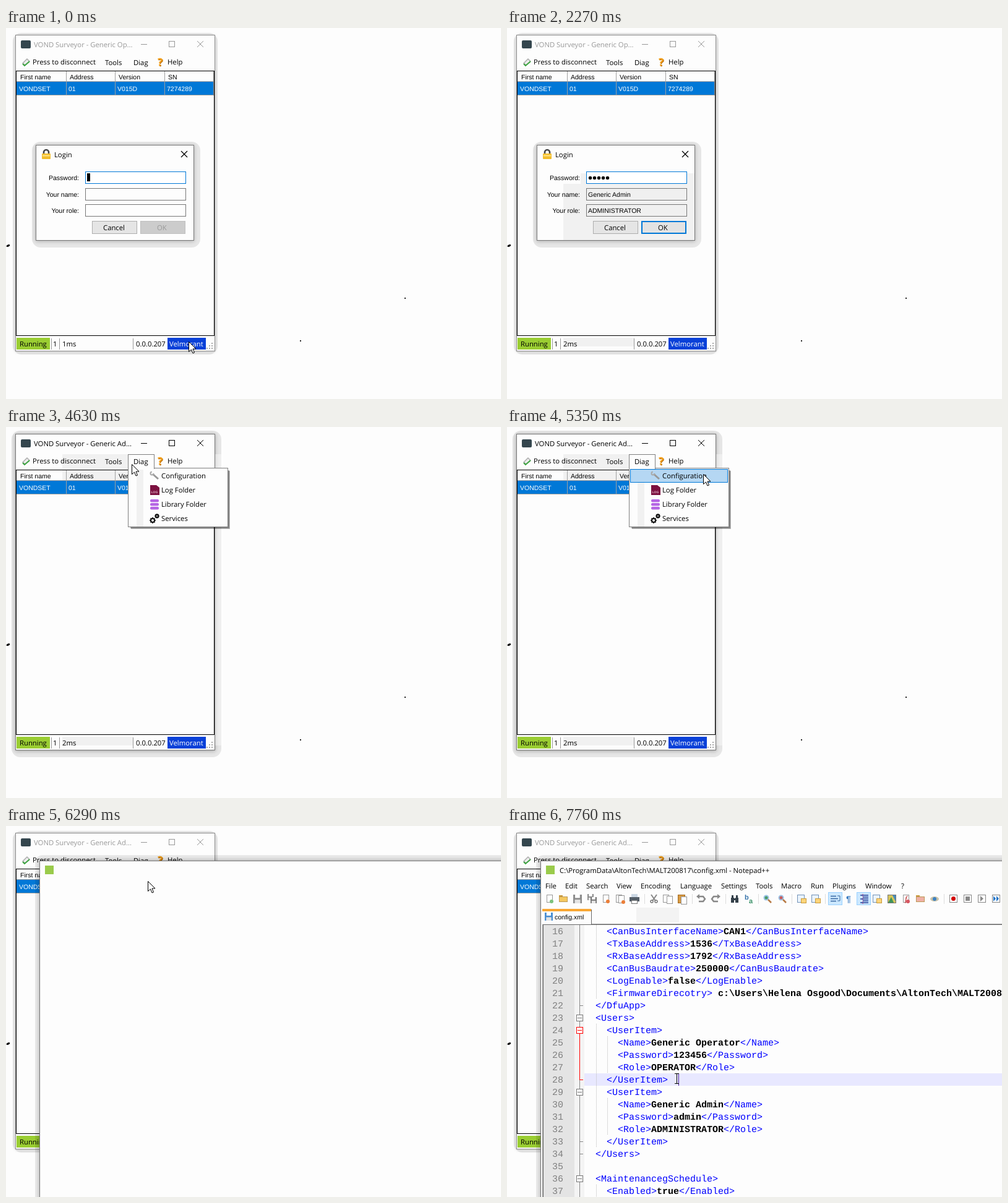
These frames come from a looping animation (800x600 px, 8000 ms). An HTML page with a canvas:

```html
<!DOCTYPE html>
<html lang="en">
<head>
<meta charset="utf-8">
<title>Login and configuration</title>
<style>
html, body { margin: 0; width: 100%; height: 100%; overflow: hidden; background: #fdfdfd; }
canvas { display: block; }
</style>
</head>
<body>
<canvas id="stage" width="800" height="600"></canvas>
<script>
const g = document.getElementById('stage').getContext('2d');
const LOOP = 8000, PAPER = '#fdfdfd', BLUE = '#0078d7', PATCH = '#f1f1f1';
const UI = '11.3px "Open Sans", "Noto Sans", sans-serif';
const SMALL = '10.5px "Liberation Sans", Arial, sans-serif';
const MONO = '15px "Liberation Mono", "Courier New", monospace';

// Pointer hot spot by start time; kind: a arrow, b busy, i text beam, - hidden
const POINTER = [
  [0, 295, 507, 'a'], [430, 0, 0, '-'], [690, 295, 507, 'a'], [1220, 0, 0, '-'],
  [2390, 295, 507, 'a'], [3470, 288, 491, 'a'], [3590, 265, 405, 'a'],
  [3710, 225, 275, 'a'], [3830, 190, 167, 'a'], [3980, 167, 112, 'a'],
  [4100, 184, 76, 'a'], [4220, 198, 63, 'a'], [4370, 194, 54, 'a'],
  [4490, 203, 60, 'a'], [4870, 215, 70, 'a'], [4990, 240, 77, 'a'],
  [5110, 272, 77, 'a'], [5230, 300, 76, 'a'], [5350, 317, 76, 'a'],
  [5500, 232, 77, 'a'], [5660, 238, 84, 'b'], [6290, 229, 89, 'a'],
  [6720, 236, 140, 'a'], [6840, 240, 180, 'i'], [6990, 258, 300, 'i'],
  [7110, 281, 394, 'i'], [7260, 284, 399, 'i'], [7400, 281, 403, 'i'],
  [7520, 277, 406, 'i'], [7640, 274, 408, 'i']
];
const DOTS = [[0, 0], [430, 1], [1220, 2], [1500, 3], [1620, 4], [1740, 5]];

const CODE = `    <CanBusInterfaceName>CAN1</CanBusInterfaceName>
    <TxBaseAddress>1536</TxBaseAddress>
    <RxBaseAddress>1792</RxBaseAddress>
    <CanBusBaudrate>250000</CanBusBaudrate>
    <LogEnable>false</LogEnable>
    <FirmwareDirecotry> c:\\Users\\Helena Osgood\\Documents\\AltonTech\\MALT200817
  </DfuApp>
  <Users>
    <UserItem>
      <Name>Generic Operator</Name>
      <Password>123456</Password>
      <Role>OPERATOR</Role>
    </UserItem>
    <UserItem>
      <Name>Generic Admin</Name>
      <Password>admin</Password>
      <Role>ADMINISTRATOR</Role>
    </UserItem>
  </Users>

  <MaintenancegSchedule>
    <Enabled>true</Enabled>`.split('\n');

const within = (t, a, b) => t >= a && t < b;
const latest = (table, t) => table.filter(k => k[0] <= t).pop();

function fill(x, y, w, h, color) {
  g.fillStyle = color;
  g.fillRect(x, y, w, h);
}
function box(x, y, w, h, color, edge, lw = 1) {
  fill(x, y, w, h, color);
  g.strokeStyle = edge;
  g.lineWidth = lw;
  g.strokeRect(x + lw / 2, y + lw / 2, w - lw, h - lw);
}
function text(s, x, y, color = '#000', font = UI) {
  g.font = font;
  g.fillStyle = color;
  g.fillText(s, x, y);
}
function line(points, color, lw = 1, dash = []) {
  g.strokeStyle = color;
  g.lineWidth = lw;
  g.setLineDash(dash);
  g.beginPath();
  for (let i = 0; i < points.length; i += 2) g.lineTo(points[i], points[i + 1]);
  g.stroke();
  g.setLineDash([]);
}
function shape(points, color) {
  g.fillStyle = color;
  g.beginPath();
  for (let i = 0; i < points.length; i += 2) g.lineTo(points[i], points[i + 1]);
  g.fill();
}
function dot(x, y, rx, color, ry = rx, turn = 0) {
  g.fillStyle = color;
  g.beginPath();
  g.ellipse(x, y, rx, ry, turn, 0, 7);
  g.fill();
}
function ring(x, y, r, color, lw, a = 0, b = 7) {
  g.strokeStyle = color;
  g.lineWidth = lw;
  g.beginPath();
  g.arc(x, y, r, a, b);
  g.stroke();
}
function round(x, y, w, h, r, color) {
  g.fillStyle = color;
  g.beginPath();
  g.roundRect(x, y, w, h, r);
  g.fill();
}
// Window body with a flat rounded halo and a soft inner shadow
function frame(x, y, w, h, [l, t, r, b], depth, edge) {
  round(x - l, y - t, w + l + r, h + t + b, 14, 'rgba(0,0,0,.09)');
  g.save();
  g.shadowColor = `rgba(0,0,0,${depth})`;
  g.shadowBlur = 6;
  g.shadowOffsetY = 1;
  fill(x, y, w, h, PAPER);
  g.restore();
  box(x, y, w, h, PAPER, edge);
}

function mainWindow(t) {
  const active = within(t, 2390, 5920), signed = t >= 2390;
  const ink = active ? '#000' : '#999';
  if (active) frame(15, 11, 323, 512, [6, 5, 10, 11], .3, '#777');
  else frame(15, 11, 323, 512, [4, 3, 4, 5], .1, '#8c8c8c');
  const used = within(t, 4630, 6290);
  if (used) {
    fill(91, 44, 126, 24, PATCH);
    fill(338, 44, 13, 471, 'rgba(255,255,255,.35)');
  }

  round(24, 20, 16, 13, 2, '#34464e');
  text('VOND Surveyor - Generic ' + (signed ? 'Ad...' : 'Op...'), 45, 31, ink);
  line([218, 26.5, 228, 26.5], ink);
  g.strokeRect(263.5, 21.5, 9, 9);
  line([309, 21, 319, 31], ink);
  line([319, 21, 309, 31], ink);

  shape([26, 57, 34, 49, 39, 54, 31, 61], '#aaa');
  shape([28, 57, 34, 51, 37, 54, 31, 59], '#eee');
  line([27, 58, 30, 61, 38, 54], '#3ca540', 2);
  text('Press to disconnect', 43, 59);
  text('Tools', 160, 60);
  if (within(t, 4220, 4630)) box(197, 44, 43, 23, '#b5d7f3', BLUE);
  text('Diag', 206, 60);
  text('?', 246, 62, '#b96b00', 'bold 17px "Open Sans", sans-serif');
  text('?', 245, 61, '#f5a21b', 'bold 17px "Open Sans", sans-serif');
  text('Help', 261, 59);

  box(16, 69, 321, 429, PAPER, '#000');
  if (used) fill(91, 70, 244, 17, PATCH);
  fill(17, 87, 319, 21, BLUE);
  line([17, 86.5, 336, 86.5], '#a0a0a0');
  line([17, 108.5, 336, 108.5], '#a0a0a0');
  for (const x of [97.5, 176.5, 256.5, 335.5]) line([x, 70, x, 108], '#a0a0a0');
  [['First name', 23, 'VONDSET', 21], ['Address', 103, '01', 101],
   ['Version', 182, 'V015D', 180], ['SN', 262, '7274289', 260]].forEach(([head, hx, cell, cx]) => {
    text(head, hx, 83, '#000', SMALL);
    text(cell, cx, 102, '#fff', SMALL);
  });

  if (within(t, 1740, 2390) || used) fill(91, 501, 114, 14, PATCH);
  fill(17, 501, 54, 19, '#9acd32');
  text('Running', 22, 515);
  for (const x of [73.5, 86.5, 205.5]) line([x, 502, x, 520], '#999');
  text('1', 76, 515);
  text(t < 690 ? '1ms' : '2ms', 91, 515);
  text('0.0.0.207', 210, 515);
  fill(261, 501, 62, 19, '#0a41d8');
  text('Velmorant', 264, 515, '#fff');
  for (let r = 0; r < 3; r++)
    for (let c = 2 - r; c < 3; c++) fill(324 + c * 4, 509 + r * 4, 2, 2, '#aaa');
}

function loginDialog(t) {
  const done = t >= 1740, dots = latest(DOTS, t)[1];
  frame(48, 189, 256, 155, [6, 5, 10, 11], .25, '#777');
  if (done) {
    fill(119, 235, 184, 108, PATCH);
    fill(91, 252, 28, 91, PATCH);
  }
  ring(65, 201, 4, '#444', 2.5, Math.PI, 0);
  line([61, 200, 61, 205], '#444', 2.5);
  line([69, 200, 69, 205], '#444', 2.5);
  round(58, 203, 14, 9, 1, '#f2bd2c');
  line([59, 206.5, 71, 206.5], '#ffe48a', 2);
  text('Login', 78, 209);
  line([283, 199, 293, 209], '#000', 1.2);
  line([293, 199, 283, 209], '#000', 1.2);

  g.textAlign = 'right';
  ['Password:', 'Your name:', 'Your role:'].forEach((s, i) =>
    text(s, 118, [246, 273, 299][i], '#000', SMALL));
  g.textAlign = 'left';
  box(128, 232, 163, 20, '#fff', BLUE);
  for (const y of [259, 285]) box(128, y, 163, 20, done ? '#f0f0f0' : PAPER, '#777');
  for (let i = 0; i < dots; i++) dot(134.5 + i * 7, 242.5, 2.7, '#000');
  if (t < 150 || within(t, 430, 940) || within(t, 1220, 2270)) fill(131 + dots * 7, 235, 5, 13, '#000');
  if (done) {
    text('Generic Admin', 131, 273, '#000', SMALL);
    text('ADMINISTRATOR', 131, 299, '#000', SMALL);
  }
  box(139, 312, 73, 21, '#e5e5e5', '#adadad');
  text('Cancel', 157, 327);
  if (done) box(217, 312, 73, 21, '#e3e3e3', BLUE, 2);
  else box(217, 312, 73, 21, '#ccc', '#bfbfbf');
  text('OK', 244, 327, done ? '#000' : '#999');
}

function gear(x, y, r) {
  ring(x, y, r, '#111', 2);
  for (let i = 0; i < 8; i++) {
    const c = Math.cos(i * Math.PI / 4), s = Math.sin(i * Math.PI / 4);
    line([x + c * r, y + s * r, x + c * (r + 2), y + s * (r + 2)], '#111', 1.6);
  }
}

function diagMenu(t) {
  fill(202, 71, 160, 94, 'rgba(0,0,0,.25)');
  fill(201, 70, 160, 94, 'rgba(0,0,0,.3)');
  box(197, 66, 162, 96, PAPER, '#808080');
  box(197, 44, 43, 24, PAPER, '#808080');
  fill(198, 66, 41, 3, PAPER);
  text('Diag', 206, 60);
  fill(211, 69, 11, 92, PATCH);
  if (t >= 4990) box(199, 68, 158, 22, '#b5d7f3', BLUE);
  ['Configuration', 'Log Folder', 'Library Folder', 'Services'].forEach((s, i) =>
    text(s, 251, 83 + i * 23));
  line([237, 76, 246, 84], '#999', 3);
  ring(236, 75, 2.5, '#aaa', 2, 0, 4.6);
  shape([233, 94, 243, 94, 248, 98, 248, 110, 233, 110], '#7c1040');
  text('LOG', 234.5, 107, '#e4bac9', 'bold 5px "Liberation Sans", sans-serif');
  for (let i = 0; i < 3; i++) round(233, 117 + i * 6, 14, 4.5, 2, '#b565e4');
  gear(237, 151, 3);
  gear(244, 144, 2);
}

function page(x, mark, y = 111) {
  box(x - 5, y, 10, 13, '#fff', '#999');
  if (mark) dot(x + 3, y + 11, 3, mark);
}
function folder(x, color = '#f4c860') {
  fill(x - 7, 112, 6, 3, '#c9993c');
  box(x - 7, 114, 14, 9, color, '#bd9a58');
}
function disk(x, y, s, color) {
  fill(x, y, s, s, color);
  fill(x + s * .22, y, s * .55, s * .38, '#fff');
  fill(x + s * .18, y + s * .58, s * .64, s * .42, '#e4e4e4');
}
function lens(x, color) {
  dot(x - 2, 116, 4.5, '#9cc3e6');
  dot(x - 2, 116, 2.5, color);
  line([x + 1, 119, x + 6, 124], '#b77a45', 2.5);
}
function panes(x) {
  box(x - 7, 111, 12, 13, '#eaf3fc', '#7393b8');
  box(x - 1, 117, 9, 8, '#ffd57a', '#c89b3d');
}
function key(x, color, points) {
  box(x - 6, 111, 13, 13, '#fff', '#888');
  if (points) shape(points, color);
  else fill(x - 3, 114, 7, 7, color);
}

function toolbar() {
  for (const x of [222, 299, 353, 406, 460, 514, 706]) line([x + .5, 110, x + .5, 126], '#ddd');
  page(69, '#7cc27b');
  folder(91);
  disk(107, 111, 14, '#8d8d8d');
  disk(130, 110, 10, '#8d8d8d');
  disk(135, 115, 10, '#777');
  page(160, '#eb7e38');
  page(181); page(185, '#eb7e38', 112);
  fill(201, 110, 10, 6, '#ccd8e5');
  fill(198, 115, 16, 7, '#555f69');
  box(201, 120, 10, 6, '#fff', '#777');
  line([233, 111, 240, 121], '#888', 2);
  line([242, 111, 235, 121], '#888', 2);
  ring(234, 122, 2, '#777', 1.5); ring(241, 122, 2, '#777', 1.5);
  page(257); page(263, null, 113);
  box(276, 111, 12, 14, '#d89a43', '#a46b20');
  page(286, null, 114);
  for (const [x, d] of [[314, 1], [337, -1]]) {
    line([x - 6 * d, 114, x + 3 * d, 114, x + 6 * d, 118, x + 3 * d, 122, x - 4 * d, 122], '#888', 2.5);
    shape([x - 8 * d, 114, x - 3 * d, 110, x - 3 * d, 118], '#888');
  }
  fill(362, 116, 5, 8, '#34404a'); fill(369, 116, 5, 8, '#34404a');
  fill(363, 112, 3, 4, '#34404a'); fill(370, 112, 3, 4, '#34404a'); fill(366, 117, 4, 3, '#34404a');
  text('b', 384, 119, '#3471a9', 'bold 11px "Liberation Sans", sans-serif');
  text('a', 391, 125, '#3a9168', 'bold 11px "Liberation Sans", sans-serif');
  lens(421, '#4c9b68'); lens(445, '#c65b5b');
  panes(476); panes(499);
  for (const x of [519, 565]) box(x, 107, 23, 21, '#cce8ff', '#99d1ff');
  for (let i = 0; i < 3; i++) line([523, 113.5 + i * 4, 532 + i % 2 * 3, 113.5 + i * 4], '#3566a1', 1.5);
  line([534, 113, 538, 113, 538, 121, 534, 121], '#3566a1');
  text('¶', 548, 123, '#3d7ec2', 'bold 14px "Liberation Sans", sans-serif');
  for (let i = 0; i < 5; i++) line([571 + i % 2 * 4, 112 + i * 3, 584, 112 + i * 3], '#223d96', 1.5);
  line([575, 110, 575, 126], '#e05', 1, [1, 2]);
  panes(598);
  box(615, 111, 14, 14, '#d7c55a', '#777');
  shape([616, 124, 621, 115, 625, 124], '#3f945b');
  shape([623, 112, 628, 112, 628, 122], '#438cc0');
  page(645, '#d75560');
  text('f', 643, 122, '#b22', 'italic 13px "Liberation Serif", serif');
  folder(668, '#efb0a5');
  dot(691, 118, 7, '#c9c3aa', 4);
  dot(691, 118, 3, '#3c81c2');
  key(721, '#fff'); dot(721.5, 117.5, 3.5, '#d10000');
  key(744, '#888');
  key(767, '#888', [765, 113, 770, 117.5, 765, 122]);
  key(790, '#1c73c8', [786, 113, 790, 117.5, 786, 122]);
  shape([791, 113, 795, 117.5, 791, 122], '#1c73c8');

  fill(57, 134, 79, 25, PAPER);
  fill(136, 135, 1, 24, '#696969');
  fill(57, 134, 79, 4, '#f9a733');
  disk(61, 140, 13, '#4b8fd2');
  text('config.xml', 77, 151, '#000', SMALL);
  fill(209, 132, 69, 24, '#f3f3f3');
}

function codeLine(s, row) {
  const y = 175 + row * 20;
  let x = 125;
  text(String(row + 16), 73, y, '#808080', MONO);
  for (const part of s.split(/(<[^>]*>)/)) {
    const tag = part[0] === '<';
    text(part, x, y, tag ? '#0000ff' : '#000', tag ? MONO : 'bold ' + MONO);
    x += part.length * 9;
  }
}

function editor(t) {
  round(47, 47, 780, 600, 12, 'rgba(0,0,0,.08)');
  g.save();
  g.shadowColor = 'rgba(0,0,0,.35)';
  g.shadowBlur = 7;
  fill(55, 56, 760, 560, PAPER);
  g.restore();
  box(54, 56, 760, 560, PAPER, '#777');
  fill(63, 64, 14, 14, '#9acb4b');
  if (t < 6440) return;

  text('C:\\ProgramData\\AltonTech\\MALT200817\\config.xml - Notepad++', 85, 76);
  if (t < 6720) box(209, 87, 64, 19, '#e5f3ff', '#cce8ff');
  [['File', 62], ['Edit', 94], ['Search', 128], ['View', 177], ['Encoding', 216],
   ['Language', 280], ['Settings', 346], ['Tools', 402], ['Macro', 443], ['Run', 491],
   ['Plugins', 526], ['Window', 579], ['?', 637]].forEach(([s, x]) => text(s, x, 101));

  box(57, 158, 760, 460, PAPER, '#a0a0a0');
  box(58, 159, 760, 460, PAPER, '#696969');
  if (t >= 6570) toolbar();
  fill(59, 160, 50, 440, '#e4e4e4');
  fill(109, 160, 16, 440, '#f4f4f4');
  fill(125, 400, 675, 20, '#e8e8ff');

  const dash = [1, 1];
  for (const [x, a, b] of [[144.5, 0, 6], [144.5, 8, 18], [144.5, 21, 22], [162.5, 9, 12], [162.5, 14, 17]])
    line([x, 160 + a * 20, x, 160 + b * 20], '#bbb', 1, dash);
  line([117.5, 160, 117.5, 600], '#888');
  line([117.5, 330, 117.5, 410], '#f00');
  for (const row of [6, 12, 17, 18]) {
    const y = 170.5 + row * 20;
    line([117, y, 123, y], row === 12 ? '#f00' : '#888');
  }
  for (const row of [7, 8, 13, 20]) {
    const y = 165 + row * 20, c = row === 8 ? '#f00' : '#777';
    box(112, y, 11, 11, '#fff', c);
    line([114, y + 5.5, 121, y + 5.5], c);
  }
  CODE.forEach(codeLine);
  if (t < 6840 || t >= 7260) fill(277, 400, 1, 20, '#4a1a9c');
}

function pointer(t) {
  const [, x, y, kind] = latest(POINTER, t);
  if (kind === '-') return;
  if (kind === 'i') {
    line([x - 3, y - 7.5, x + 4, y - 7.5], '#000');
    line([x + .5, y - 8, x + .5, y + 8], '#000');
    line([x - 3, y + 8.5, x + 4, y + 8.5], '#000');
    return;
  }
  g.save();
  g.translate(x + .5, y + .5);
  const arrow = [0, 0, 0, 16, 4, 12.5, 6.5, 18.5, 9, 17.5, 6.5, 11.5, 11.5, 11.5];
  shape(arrow, '#fff');
  line([...arrow, 0, 0], '#000');
  g.restore();
  if (kind === 'b') {
    ring(x + 13, y, 5.5, '#3b9de0', 4);
    const a = t / 160;
    ring(x + 13, y, 5.5, '#8fd0f5', 4, a, a + 2);
  }
}

function draw(now) {
  const t = now % LOOP;
  fill(0, 0, 800, 600, PAPER);
  dot(3.5, 352, 3, '#000', 1.7, -.4);
  fill(644, 436, 2, 2, '#222');
  fill(475, 505, 2, 2, '#222');
  mainWindow(t);
  if (t < 2390) loginDialog(t);
  if (within(t, 4630, 5660)) diagMenu(t);
  if (t >= 6290) editor(t);
  pointer(t);
}

const start = performance.now();
function tick() {
  draw(performance.now() - start);
  requestAnimationFrame(tick);
}
g.textRendering = 'geometricPrecision';
tick();
</script>
</body>
</html>
```
